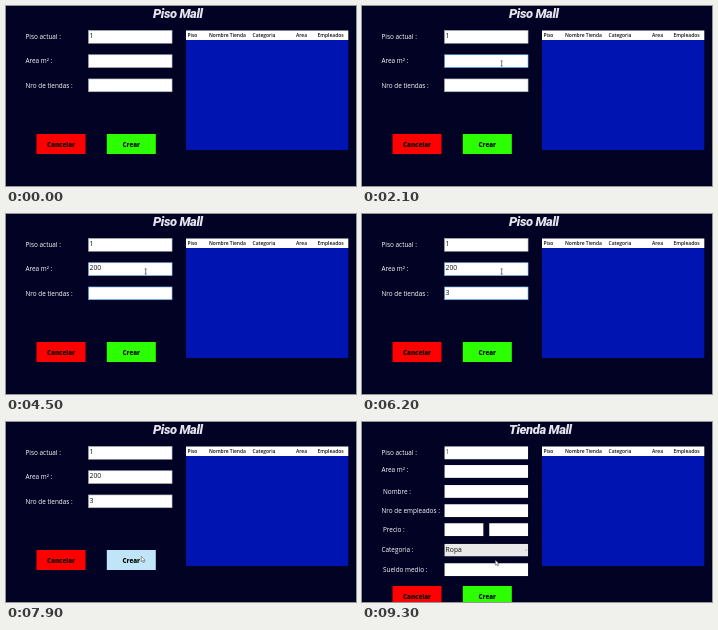
Write an HTML page that moves like this. It is 350 px wide and 180 px high and loops after 9400 ms.

```html
<!DOCTYPE html>
<html lang="es">
<head>
<meta charset="utf-8">
<title>Piso Mall</title>
<style>
  html, body { margin: 0; width: 100%; height: 100%; overflow: hidden; background: #020224; }
  svg { display: block; }
  text { font-family: "Open Sans", "Noto Sans", sans-serif; white-space: pre; }
  .title { font: italic 900 13px Roboto, sans-serif; letter-spacing: -.4px; fill: #e4e4ee; }
  .label { font-size: 6.4px; font-weight: 500; fill: #fff; }
  .value { font-size: 6.8px; fill: #111; }
  .head { font-size: 4.95px; font-weight: 600; fill: #111; }
  .button { font-size: 6.2px; font-weight: 800; fill: #081008; text-anchor: middle; }
</style>
</head>
<body>
<svg id="stage" width="350" height="180" viewBox="0 0 350 180"></svg>
<script>
const LOOP = 9400, STEP = 100, PAGE_CHANGE = 8000;
const stage = document.getElementById("stage");

function add(parent, tag, attrs = {}, text = "") {
  const node = document.createElementNS("http://www.w3.org/2000/svg", tag);
  for (const name in attrs) node.setAttribute(name, attrs[name]);
  node.textContent = text;
  parent.append(node);
  return node;
}
const rect = (parent, x, y, width, height, fill) =>
  add(parent, "rect", { x, y, width, height, fill });
const write = (parent, kind, x, y, text) =>
  add(parent, "text", { class: kind, x, y }, text);

function field(parent, x, y, width, height, value = "") {
  const box = rect(parent, x + .25, y + .25, width - .5, height - .5, "#fff");
  box.setAttribute("stroke-width", .6);
  return { x, y, width, height, box, text: write(parent, "value", x + 1.3, y + 7.9, value) };
}

function button(parent, x, y, label, fill) {
  const box = rect(parent, x, y, 49, 20, fill);
  write(parent, "button", x + 24.5, y + 12.6, label);
  return { x, y, width: 49, height: 20, box };
}

function page(title, labels, buttonTop) {
  const group = add(stage, "g");
  write(group, "title", 147, 11.7, title);
  for (const [x, y, text] of labels) write(group, "label", x, y, text);
  button(group, 30.5, buttonTop, "Cancelar", "#ff0000");
  return { group, create: button(group, 100.8, buttonTop, "Crear", "#2cff00") };
}

rect(stage, 0, 0, 350, 180, "#020224");
rect(stage, 180, 24.5, 162.3, 9.5, "#fff");
rect(stage, 180, 34, 162.3, 110, "#0014b2");
for (const [x, text] of [[181.5, "Piso"], [203, "Nombre Tienda"], [246.5, "Categoria"], [290, "Area"], [311.5, "Empleados"]])
  write(stage, "head", x, 31.1, text);

const floorPage = page("Piso Mall", [
  [19.5, 33.2, "Piso actual :"], [19.5, 57.4, "Area m² :"], [19.5, 81.6, "Nro de tiendas :"]
], 128);
const floorField = field(floorPage.group, 82.3, 24.2, 84, 13.3, "1");
const areaField = field(floorPage.group, 82.3, 48.5, 84, 13.3);
const shopsField = field(floorPage.group, 82.3, 72.7, 84, 13.3);
const caret = rect(floorPage.group, 0, 0, .6, 7.5, "#111");

const shopPage = page("Tienda Mall", [
  [19.5, 33.2, "Piso actual :"], [19.5, 49.8, "Area m² :"], [21, 72, "Nombre :"],
  [19.5, 90.6, "Nro de empleados :"], [21, 110.4, "Precio :"],
  [19.5, 130.4, "Categoria :"], [21, 150.4, "Sueldo medio :"]
], 164);
field(shopPage.group, 82.3, 24.2, 84, 13.3, "1").text.style.fill = "#555";
for (const y of [42.8, 62.8, 82, 141]) field(shopPage.group, 82.3, y, 84, 13.3);
for (const x of [82.3, 127]) field(shopPage.group, x, 101, 39.3, 13.3);
field(shopPage.group, 82.3, 121.7, 84, 12.8, "Ropa").box.setAttribute("fill", "#e9e9e9");
add(shopPage.group, "path", { d: "M163 127.5l1 1 1-1", fill: "none", stroke: "#666", "stroke-width": .5 });

const arrow = add(stage, "path", {
  d: "M0 0V5.2L1.3 4.1 2.2 6 3.1 5.6 2.3 3.8H3.9Z", fill: "#fff", stroke: "#111", "stroke-width": .4
});
const beam = add(stage, "path", {
  d: "M-1-2.6H1M0-2.6V2.6M-1 2.6H1", fill: "none", stroke: "#222", "stroke-width": .6
});

// Each entry: time, x, y
const pointerPath = [
  [0, 131, 186], [300, 131, 186], [800, 135.3, 108], [1400, 139.7, 57.5], [7000, 139.7, 57.5],
  [7700, 135.3, 134.5], [9000, 135.3, 134.5], [9300, 133.3, 138], [LOOP, 133.3, 138]
];
const caretSpans = [
  [1600, 2100], [2600, 3200], [3400, 4500], [4900, 5400], [5600, 6200], [6700, 7200], [7700, 7900]
];
const areaKeys = [2600, 2700, 3400], shopsKeys = [5600];

function pointerAt(time) {
  const i = pointerPath.findIndex(([end]) => time < end);
  const [t0, x0, y0] = pointerPath[i - 1], [t1, x1, y1] = pointerPath[i];
  const k = (time - t0) / (t1 - t0);
  return [x0 + (x1 - x0) * k, y0 + (y1 - y0) * k];
}
const typed = (text, keys, time) => text.slice(0, keys.filter(key => time >= key).length);
const inside = (box, x, y) =>
  x >= box.x && x < box.x + box.width && y >= box.y && y < box.y + box.height;
const show = (node, visible) => node.setAttribute("visibility", visible ? "visible" : "hidden");

function draw(time) {
  const onFloor = time < PAGE_CHANGE;
  const [x, y] = pointerAt(time);
  floorPage.group.style.display = onFloor ? "" : "none";
  shopPage.group.style.display = onFloor ? "none" : "";

  areaField.text.textContent = typed("200", areaKeys, time);
  shopsField.text.textContent = typed("3", shopsKeys, time);

  const focused = time < 1600 || time >= 7900 ? null : time < 3800 ? areaField : shopsField;
  let overField = false;
  for (const item of [floorField, areaField, shopsField]) {
    const hovered = onFloor && inside(item, x, y);
    overField ||= hovered;
    item.box.setAttribute("stroke", item === focused ? "#569de5" : hovered ? "#7eb4ea" : "#abadb3");
  }

  const caretOn = focused && caretSpans.some(([from, to]) => time >= from && time < to);
  caret.style.display = caretOn ? "" : "none";
  if (caretOn) {
    caret.setAttribute("x", focused.x + 1.5 + 3.9 * focused.text.textContent.length);
    caret.setAttribute("y", focused.y + 1.8);
  }

  floorPage.create.box.setAttribute("fill", inside(floorPage.create, x, y) ? "#c0e4f8" : "#2cff00");
  // The new button keeps its hover look until the pointer moves again
  shopPage.create.box.setAttribute("fill", time < 9100 ? "#c0e4f8" : "#2cff00");

  for (const shape of [arrow, beam]) shape.setAttribute("transform", `translate(${x} ${y})`);
  show(arrow, !overField);
  show(beam, overField);
}

const start = performance.now();
function tick() {
  const elapsed = (performance.now() - start) % LOOP;
  draw(Math.floor(elapsed / STEP) * STEP);
  requestAnimationFrame(tick);
}
tick();
</script>
</body>
</html>
```
